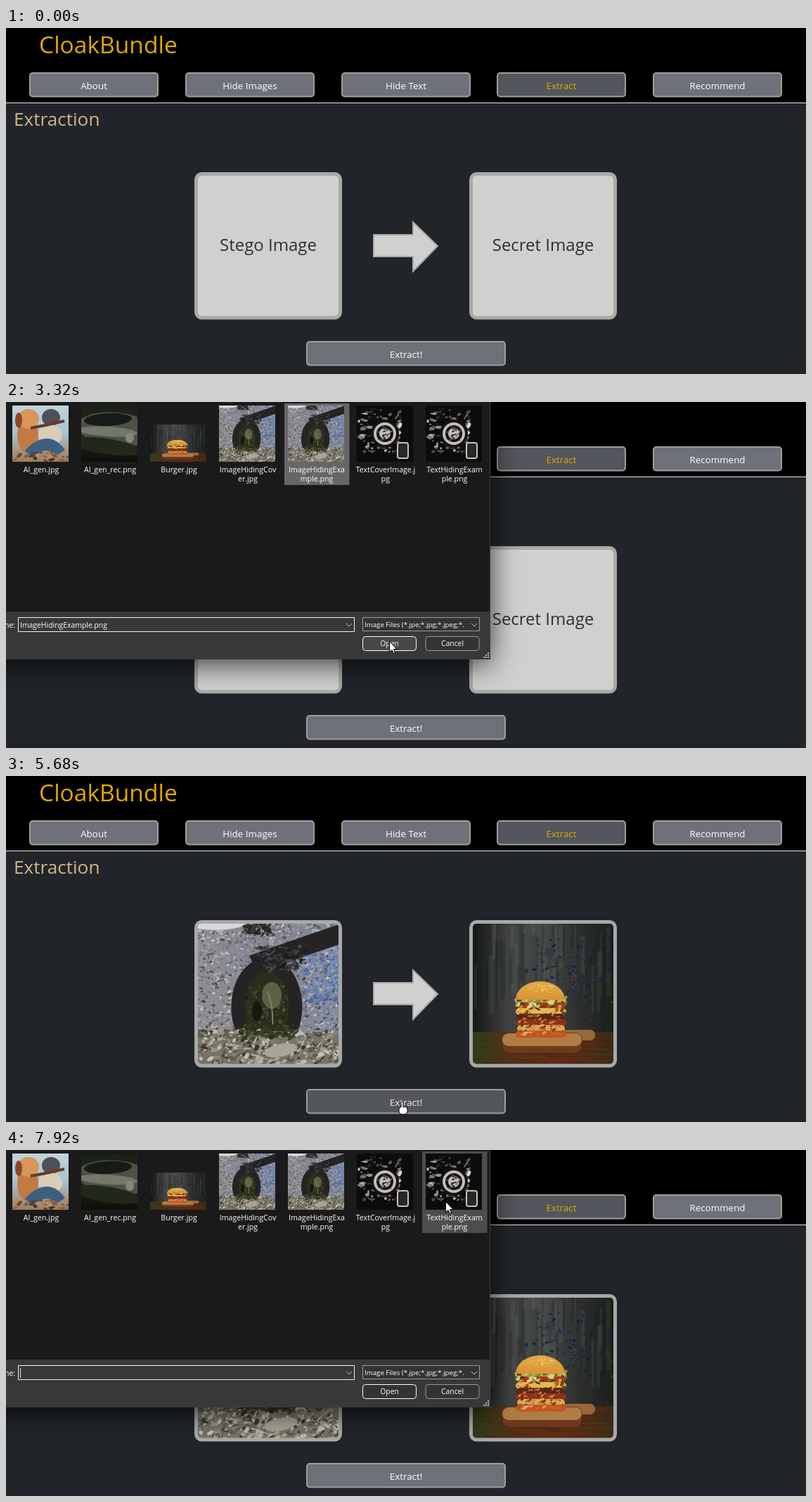
Write an HTML page with a canvas that moves like this. It is 1138 px wide and 492 px high and loops after 7.99 s.

```html
<!DOCTYPE html>
<html lang="en">
<head>
<meta charset="utf-8">
<title>Extraction</title>
<style>
html, body { margin: 0; width: 100%; height: 100%; overflow: hidden; background: #212529; }
canvas { display: block; }
</style>
</head>
<body>
<canvas id="stage" width="1138" height="492"></canvas>
<script>
const LOOP = 7990;
const FONT = '"Open Sans", "Noto Sans", sans-serif';
const stage = document.getElementById('stage').getContext('2d');

// ---------- helpers ----------
const clamp = v => Math.max(0, Math.min(1, v));
const inside = (p, x, y, w, h) => p.x >= x && p.x < x + w && p.y >= y && p.y < y + h;

function makeCanvas(w, h) {
  const canvas = document.createElement('canvas');
  canvas.width = w;
  canvas.height = h;
  return canvas.getContext('2d');
}

function rect(c, x, y, w, h, fill) {
  c.fillStyle = fill;
  c.fillRect(x, y, w, h);
}

function box(c, x, y, w, h, radius, line, border, fill) {
  c.beginPath();
  c.roundRect(x + line / 2, y + line / 2, w - line, h - line, radius);
  c.fillStyle = fill;
  c.fill();
  c.lineWidth = line;
  c.strokeStyle = border;
  c.stroke();
}

function oval(c, fill, x, y, rx, ry, turn = 0) {
  c.beginPath();
  c.ellipse(x, y, rx, ry, turn, 0, 2 * Math.PI);
  c.fillStyle = fill;
  c.fill();
}

function curve(c, color, width, x0, y0, x1, y1, x2, y2) {
  c.beginPath();
  c.moveTo(x0, y0);
  c.quadraticCurveTo(x1, y1, x2, y2);
  c.strokeStyle = color;
  c.lineWidth = width;
  c.stroke();
}

function text(c, str, x, y, size, fill, align = 'center') {
  c.font = `${size}px ${FONT}`;
  c.textAlign = align;
  c.fillStyle = fill;
  c.fillText(str, x, y);
}

function shade(c, x, y, ...colors) {
  const g = c.createLinearGradient(0, 0, x, y);
  colors.forEach((color, i) => g.addColorStop(i / (colors.length - 1), color));
  return g;
}

let seed = 7;
function rand(a, b) {
  seed = (seed * 16807) % 2147483647;
  return a + (b - a) * seed / 2147483647;
}

// Scatters n slanted grains of one hue over a w by h area.
function grains(c, n, x, y, w, h, size, hue, sat, dark, light) {
  for (let i = 0; i < n; i++) {
    oval(c, `hsl(${hue} ${sat}% ${rand(dark, light)}%)`, x + rand(0, w), y + rand(0, h),
      rand(.6, size), rand(.5, size / 2), rand(-1.2, .6));
  }
}

// ---------- pictures ----------
function picture(size, paint) {
  const c = makeCanvas(size, size);
  paint(c);
  return c.canvas;
}

const cave = picture(200, c => {
  rect(c, 0, 0, 200, 200, shade(c, 200, 0, '#908e92', '#85848b', '#7f8aa3'));
  grains(c, 1500, 0, 0, 200, 160, 3.5, 255, 4, 25, 82);
  grains(c, 170, 150, 25, 50, 90, 5, 219, 34, 42, 68);
  grains(c, 40, 35, 28, 45, 47, 4, 222, 25, 55, 65);
  oval(c, '#d8d8dc', 25, 0, 42, 9);
  grains(c, 60, 68, 0, 37, 16, 6, 80, 4, 12, 22);

  oval(c, '#2b2e1d', 98, 122, 36, 56);
  grains(c, 150, 68, 85, 62, 65, 4, 70, 22, 8, 30);
  oval(c, '#5d6246', 105, 102, 14, 19);
  curve(c, '#85806a', 2, 106, 145, 108, 120, 99, 96);
  oval(c, '#17180f', 84, 124, 7, 14);
  curve(c, '#252324', 27, 78, 58, 128, 40, 204, 14);
  c.beginPath();
  c.ellipse(98, 118, 41, 60, 0, 2.6, 6.9);
  c.lineWidth = 19;
  c.stroke();
  grains(c, 130, 85, 32, 70, 35, 5, 300, 3, 9, 32);

  rect(c, 0, 156, 200, 44, '#77736a');
  grains(c, 520, 0, 152, 200, 48, 6, 52, 10, 18, 76);
  grains(c, 80, 55, 144, 90, 20, 6, 70, 28, 12, 22);
  oval(c, '#a9a496', 118, 180, 24, 9, -.2);
});

const burger = picture(200, c => {
  rect(c, 0, 0, 200, 200, shade(c, 200, 0, '#141716', '#3f4241', '#484b49', '#2c2f2d', '#1b1f1c'));
  for (let i = 0; i < 50; i++) {
    rect(c, rand(0, 200), rand(-20, 60), rand(2, 7), rand(30, 100), i % 2 ? '#0f121330' : '#7b7e7922');
  }
  grains(c, 110, 75, 20, 125, 95, 3.5, 228, 50, 14, 24);
  grains(c, 60, 130, 40, 70, 110, 3, 60, 25, 10, 20);

  rect(c, 0, 154, 200, 46, shade(c, 200, 0, '#303b1b', '#5a2c16', '#6b2414', '#3c2a17'));
  for (let i = 0; i < 70; i++) {
    rect(c, rand(-20, 190), rand(156, 200), rand(15, 70), 1.5, `hsl(${rand(0, 95)} 55% 18% / .6)`);
  }
  box(c, 105, 150, 70, 17, 8, 1, '#4a2c16', '#96683a');
  box(c, 41, 160, 115, 25, 11, 1, '#4a2412', '#6d391d');
  box(c, 41, 155, 115, 20, 10, 1, '#6d391d', '#b07c45');

  ['#b9a85a', '#b03318', '#e5b850', '#5c2514', '#8f3117', '#dda650', '#c4551f'].forEach((fill, i) => {
    const half = 36 - 2 * (i % 2);
    box(c, 97 - half, 104 + 8 * i, 2 * half, 10, 5, 1, fill, fill);
  });
  grains(c, 90, 61, 104, 72, 15, 5, 52, 50, 15, 75);
  grains(c, 100, 64, 120, 66, 38, 4, 25, 65, 15, 70);
  c.beginPath();
  c.ellipse(96, 108, 35, 26, 0, Math.PI, 0);
  c.fillStyle = shade(c, 0, 120, '#f3c95c', '#f0be52', '#d38a30');
  c.fill();
  grains(c, 22, 76, 86, 40, 12, 2, 40, 85, 65, 80);
});

const friends = picture(80, c => {
  rect(c, 0, 0, 80, 80, shade(c, 0, 80, '#c3d3da', '#a8c2d2', '#a07c5a'));
  oval(c, '#c07a42', 22, 42, 15, 26);
  oval(c, '#d8965a', 23, 19, 15, 14);
  oval(c, '#8c4722', 9, 21, 5, 11);
  oval(c, '#4d5054', 55, 17, 13, 12);
  oval(c, '#d9cdb9', 54, 42, 17, 15);
  curve(c, '#3d5f82', 17, 24, 70, 50, 42, 68, 68);
  curve(c, '#653c29', 4, 26, 32, 50, 28, 74, 22);
  grains(c, 40, 0, 66, 80, 14, 5, 25, 35, 20, 60);
});

const oldCar = picture(80, c => {
  rect(c, 0, 0, 80, 80, shade(c, 0, 80, '#1a2016', '#23291d', '#0c0e09'));
  oval(c, '#4c5147', 50, 34, 56, 24, .1);
  oval(c, '#171b15', 38, 20, 34, 9, -.05);
  oval(c, '#75776b', 38, 37, 42, 7, .06);
  oval(c, '#22271c', 36, 58, 50, 11, .15);
  oval(c, '#858779', 69, 46, 6, 7);
});

const camera = picture(80, c => {
  rect(c, 0, 0, 80, 80, '#0d0c0c');
  grains(c, 110, 3, 5, 60, 62, 5, 30, 4, 5, 85);
  for (let r = 20; r > 4; r -= 4) oval(c, r % 8 ? '#141313' : '#c4bfb8', 40, 40, r, r);
  grains(c, 25, 30, 30, 20, 20, 3, 30, 4, 5, 60);
  box(c, 57, 52, 17, 24, 3, 2, '#c9c2b7', '#2a2826');
});

// ---------- file dialog ----------
const files = [
  [friends, 'AI_gen.jpg'],
  [oldCar, 'AI_gen_rec.png'],
  [burger, 'Burger.jpg'],
  [cave, 'ImageHidingCov', 'er.jpg'],
  [cave, 'ImageHidingExa', 'mple.png'],
  [camera, 'TextCoverImage.j', 'pg'],
  [camera, 'TextHidingExam', 'ple.png']
];
const PAD = 80;
const panel = makeCanvas(689 + PAD, 366 + PAD);
panel.translate(PAD, PAD);

function chevron(c, x, y) {
  c.beginPath();
  c.moveTo(x - 4, y - 2);
  c.lineTo(x, y + 2);
  c.lineTo(x + 4, y - 2);
  c.lineWidth = 1;
  c.strokeStyle = '#c8c8c8';
  c.stroke();
}

function panelButton(mouse, label, x, border, bare) {
  if (bare) return rect(panel, x, 333, 78, 22, '#f4f4f4');
  box(panel, x, 333, 77, 21, 4, 1, border, inside(mouse, x, 333, 77, 21) ? '#484848' : '#333');
  text(panel, label, x + 38.5, 347, 10.4, '#fff');
}

function paintPanel(mouse, chosen, bare) {
  const c = panel;
  rect(c, -PAD, -PAD, 689 + PAD, 366 + PAD, '#1a1a1a');
  rect(c, -11, -PAD, 1, 298 + PAD, '#3c3c3c');
  rect(c, -PAD, 298, 689 + PAD, 68, '#383838');
  rect(c, 688, -PAD, 1, 366 + PAD, '#3e3e3e');

  files.forEach(([image, ...label], i) => {
    const x = 98 * i;
    const over = inside(mouse, x + 4, 2, 93, 116);
    const picked = chosen && i === 4;
    if (over || picked) rect(c, x + 4, 2, 92.5, 116, picked ? (over ? '#777' : '#666') : '#4d4d4d');
    const h = image === burger ? 53 : 80;
    c.drawImage(image, x + 9, 85 - h, 80, h);
    label.forEach((line, n) => text(c, line, x + 50, 100 + 13 * n, 10.6, '#fff'));
  });

  text(c, 'File name:', 13, 321, 10.4, '#fff', 'right');
  box(c, 17, 306, 479, 21, 0, 1, '#f2f2f2', '#383838');
  if (chosen) text(c, 'ImageHidingExample.png', 20, 321, 10.4, '#fff', 'left');
  else rect(c, 20, 310, 1, 14, '#e8e8e8');
  chevron(c, 488, 317);

  box(c, 507, 306, 167, 20, 0, 1, '#9b9b9b', inside(mouse, 507, 306, 167, 20) ? '#454545' : '#333');
  text(c, 'Image Files (*.jpe;*.jpg;*.jpeg;*.', 510, 320, 9.7, '#fff', 'left');
  chevron(c, 666, 317);

  panelButton(mouse, 'Open', 507, '#fff', bare);
  panelButton(mouse, 'Cancel', 596.5, '#9b9b9b', bare);
  if (bare) return rect(c, 674, 351, 15, 15, '#f4f4f4');
  for (let i = 0; i < 3; i++) {
    for (let j = 0; j <= i; j++) rect(c, 685 - 3 * j, 356 + 3 * i, 2, 2, '#b5b5b5');
  }
}

function drawDialog(t, mouse) {
  const second = t >= 7110;
  if (t < 1160 || (t >= 3500 && !second)) return;
  const age = t - (second ? 7110 : 1160);
  let alpha = .77 + .23 * clamp(age / 130);
  let open = 1 - (1 - clamp(age / 200)) ** 2;
  if (!second && t >= 3405) alpha = open = 1 - (t - 3340) / 160;

  paintPanel(mouse, !second && t >= 2450, age < 60);
  const scale = .944 + .056 * open;
  const c = stage;
  c.save();
  c.globalAlpha = alpha;
  c.shadowColor = 'rgba(0,0,0,.75)';
  c.shadowBlur = 40;
  c.shadowOffsetY = 6;
  c.translate(11.5 * (1 - open), 6.3 * (1 - open));
  c.scale(scale, scale);
  c.drawImage(panel.canvas, -PAD, -PAD);
  c.restore();
}

// ---------- mouse ----------
const moves = [ // from ms, to ms, goal x, goal y
  [410, 680, 345, 310],
  [1760, 2510, 420, 79],
  [2570, 3320, 545, 340],
  [3410, 4160, 537, 461],
  [4290, 4550, 553, 462],
  [5610, 5680, 563, 462],
  [5690, 6020, 567, 462],
  [6290, 6910, 423, 337],
  [7310, 7840, 625, 73]
];

function mouseAt(t) {
  const p = { x: 390, y: 466 };
  for (const [from, to, x, y] of moves) {
    const u = clamp((t - from) / (to - from));
    const eased = u * (1.3 - .3 * u);
    p.x += (x - p.x) * eased;
    p.y += (y - p.y) * eased;
  }
  return p;
}

function drawMouse({ x, y }, hand) {
  const c = stage;
  c.save();
  c.translate(Math.round(x) + .5, Math.round(y) + .5);
  if (hand) {
    box(c, -5, 7, 13, 12, 4, 1, '#000', '#fff');
    box(c, -2, 0, 4, 14, 2, 1, '#000', '#fff');
    rect(c, -3, 9, 9, 8, '#fff');
  } else {
    const arrow = new Path2D('M0 0V15L3.5 12 6 17 8 16 6 11H10.5Z');
    c.fillStyle = '#fff';
    c.fill(arrow);
    c.stroke(arrow);
  }
  c.restore();
}

// ---------- page ----------
function button(label, x, y, w, dark, color) {
  box(stage, x, y, w, 35.5, 4, 2, '#a19d98', dark ? '#54565d' : '#6e717a');
  text(stage, label, x + w / 2, y + 24, 13.4, color);
}

function card(x, label, image, fill) {
  const c = stage;
  box(c, x, 205, 210, 209.5, 8, 5, '#a9a9a9', fill);
  if (!image) return text(c, label, x + 105, 317, 24, '#2d2e30');
  c.save();
  c.beginPath();
  c.roundRect(x + 5, 210, 200, 199.5, 5);
  c.clip();
  c.drawImage(image, x + 5, 210);
  c.restore();
}

function blockArrow() {
  const c = stage;
  const shape = new Path2D('M523 294h56v-18l35 34-35 36v-21h-56z');
  c.fillStyle = '#d0d0ce';
  c.fill(shape);
  c.lineWidth = 2;
  c.strokeStyle = '#a9a9a9';
  c.stroke(shape);
}

function draw(t) {
  const c = stage;
  const mouse = mouseAt(t);
  const shown = t >= 410;
  const overButton = shown && inside(mouse, 427, 445, 284, 36);
  const overCard = shown && t < 860 && inside(mouse, 268, 205, 210, 210);

  rect(c, 0, 0, 1138, 492, '#212529');
  rect(c, 0, 0, 1138, 106, '#000');
  rect(c, 0, 106, 1138, 1, '#e8e8e8');
  text(c, 'CloakBundle', 47, 36, 33.5, '#e0a800', 'left');
  ['About', 'Hide Images', 'Hide Text', 'Extract', 'Recommend'].forEach((label, i) =>
    button(label, Math.round(33 + 221.75 * i), 63, 184, i === 3, i === 3 ? '#e0a800' : '#fff'));
  text(c, 'Extraction', 11, 139, 26.2, '#d2b48c', 'left');

  card(268, 'Stego Image', t >= 3480 && cave, overCard ? '#c8c8c7' : '#d0d0ce');
  card(659, 'Secret Image', t >= 4420 && burger, '#d0d0ce');
  blockArrow();
  button('Extract!', 427, 445, 284, overButton, overButton ? '#f5efdc' : '#fff');

  drawDialog(t, mouse);
  c.lineWidth = 1;
  c.strokeStyle = '#000';
  if (shown) drawMouse(mouse, overButton);
}

const start = performance.now();
function tick() {
  draw((performance.now() - start) % LOOP);
  requestAnimationFrame(tick);
}
tick();
</script>
</body>
</html>
```
